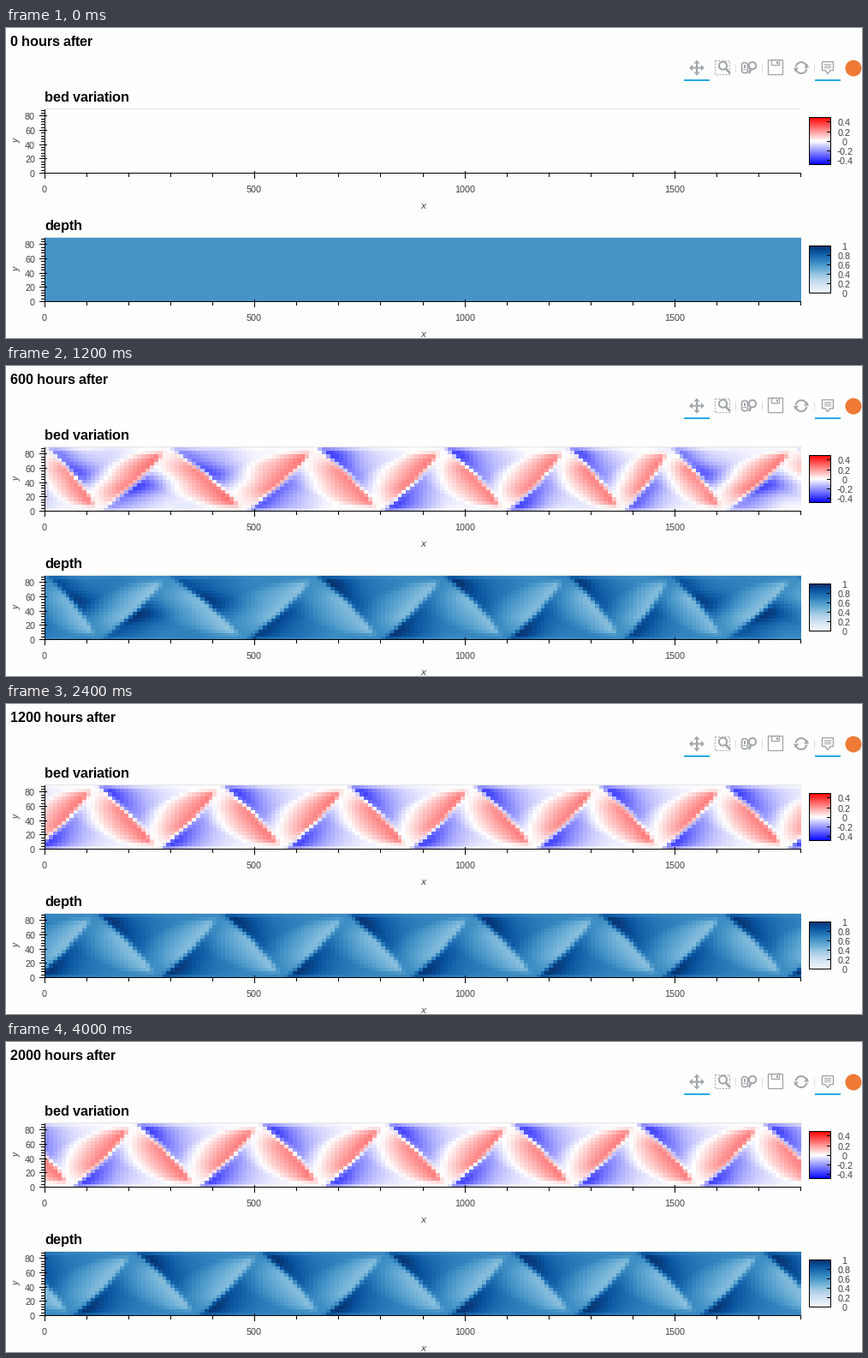
Recreate the animation shown at these times as a matplotlib script. Size 1000 by 362 pixels, loop 4200 ms.

```python
import numpy as np
import matplotlib.pyplot as plt
from matplotlib.animation import FuncAnimation
from matplotlib.patches import Arc, Circle, FancyBboxPatch, Polygon, Rectangle

W, H, DPI = 1000, 362, 100
FRAMES, STEP = 21, 200
PX = 72 / DPI
LEFT, RIGHT, PLOT_H = 45, 929, 75
NX, NY, SUB = 180, 18, 3
GRAY, ACTIVE = "#a1a6a9", "#26aae1"

plt.rcParams.update({"font.family": "Liberation Sans", "path.snap": False,
                     "text.hinting": "native", "text.hinting_factor": 1})
fig = plt.figure(figsize=(W / DPI, H / DPI), dpi=DPI, facecolor="#fefefe")
ax = fig.add_axes([0, 0, 1, 1])
ax.axis("off")


def text(x, y, s, size=11, color="#444444", ha="center", va="baseline", **kw):
    return ax.text(x, y, s, fontsize=size * PX, color=color, ha=ha, va=va, **kw)


def line(xs, ys, color="black", lw=1):
    ax.plot(xs, ys, color=color, lw=lw * PX, solid_capstyle="butt")


def box(x, y, w, h, color="black", lw=1, **kw):
    ax.add_patch(Rectangle((x, y), w, h, fill=False, ec=color, lw=lw * PX, **kw))


# Bed model: a zigzag of bar fronts whose corners touch the two banks in turn.
X, Y = np.meshgrid(LEFT + (np.arange(NX * SUB) + .5) / (NX * SUB) * (RIGHT - LEFT),
                   (np.arange(NY * SUB) + .5) / (NY * SUB))
HALF, DRIFT = 73.3, 5.6
CORNER = np.arange(-3, 17)
rng = np.random.default_rng(4)
WAVES = list(zip(rng.uniform(60, 130, 5), rng.uniform(0, 2 * np.pi, 5)))


def smooth(t):
    t = np.clip(t, 0, 1)
    return t * t * (3 - 2 * t)


def disorder(k):
    """How far each corner lags behind the even spacing: two fading clusters."""
    s = np.clip(1 - .2 * (k - 4), .05, 1)
    west = 60 * s * np.exp(-((CORNER - 4.5 + 1.2 * max(0, k - 4)) / (3 * s)) ** 2)
    east = 40 * smooth(2 * s - .3) * np.exp(-((CORNER - 12) / 1.8) ** 2)
    return west + east


def fronts(k):
    lag = disorder(k)
    v = 28 + HALF * CORNER + DRIFT * (k - 12) - lag
    z = np.zeros_like(X)
    for i in range(1, len(v) - 2):
        t = Y if CORNER[i] % 2 == 0 else 1 - Y
        d = v[i] + (v[i + 1] - v[i]) * t + 3 + 28 * t * (1 - t) - X
        up, down = (v[i + 1] - v[i - 1]) / 147, (v[i + 2] - v[i]) / 147
        reach = up * (18 + 50 * np.sin(np.pi * t ** 1.2))
        crest = .3 * smooth(t / .4) * (1 - smooth((t - .84) / .12))
        bar = crest * np.clip(1 - d / reach, 0, 1) * (1 - np.exp(-np.abs(d) / 2))
        # scour sits at the bank, or mid-channel where the pattern is disturbed
        mid = min(1, lag[i] / 55)
        bank = .52 * (1 - t) ** 1.3 * (.4 + .6 * smooth(t / .1))
        hole = .42 * np.exp(-((t - .4) / .17) ** 2) + .3 * bank
        e = np.maximum(-d, 0)
        decay = np.exp(-(e / (down * (40 - 12 * t))) ** 1.2)
        pit = (bank + mid * (hole - bank)) * decay * (1 - np.exp(-e / 2.5))
        z += np.where(d > 0, bar, -pit)
    return z


def ripples(k):
    z = sum(np.cos(2 * np.pi * (X - 8 * k) / p + a) * np.cos(np.pi * (1 + j % 3) * Y)
            for j, (p, a) in enumerate(WAVES))
    return .06 * k * np.exp(-.6 * k) * z


def bed(k):
    z = smooth(k / 4) * fronts(k) + ripples(k)
    return z.reshape(NY, SUB, NX, SUB).mean(axis=(1, 3))


def heatmap(top, cmap, lo, hi):
    return ax.imshow(np.zeros((NY, NX)), cmap=cmap, vmin=lo, vmax=hi, origin="lower",
                     extent=(LEFT, RIGHT, top + PLOT_H, top), aspect="auto",
                     interpolation="nearest")


def panel(top, title):
    base = top + PLOT_H - .5
    line([LEFT, RIGHT], [top - .5] * 2, "#e5e5e5")
    line([LEFT, RIGHT], [base] * 2)
    line([LEFT + .5] * 2, [top, base])
    text(LEFT, top - 9, title, 16, "black", "left", weight="bold")
    for u in range(0, 1801, 100):
        x = LEFT + .5 + int(u * 883 / 1800 + .5)
        major = u % 500 == 0
        line([x, x], [base - 2.5 if major else base, base + (6.5 if major else 4.5)])
        if major:
            text(x - .5, base + 22.5, str(u))
    for u in range(0, 90, 4):
        y = base - int(u * PLOT_H / 90 + .5)
        major = u % 20 == 0
        line([LEFT - (6 if major else 4), LEFT + (3 if major else 0)], [y, y])
        if major:
            text(34, y + 4.5, str(u), ha="right")
    text(487, base + 41.5, "x", style="italic")
    text(13, top + 37, "y", style="italic", va="center", rotation=90)


def colorbar(top, cmap, lo, hi, ticks):
    ax.imshow(np.linspace(hi, lo, 256)[:, None], cmap=cmap, vmin=lo, vmax=hi,
              extent=(938, 964, top + 56, top), aspect="auto")
    box(938.5, top + .5, 25, 55)
    for v in ticks:
        y = top + .5 + int(55 * (hi - v) / (hi - lo) + .5)
        line([959, 964], [y, y])
        text(979.5, y + 4.5, f"{v:g}")


def lens(x, y, r, hx, hy):
    ax.add_patch(Circle((x, y), r, fill=False, ec=GRAY, lw=2 * PX))
    n = np.hypot(hx - x, hy - y)
    line([x + (hx - x) * r / n, hx], [y + (hy - y) * r / n, hy], GRAY, 2.6)


def toolbar():
    # pan
    line([800, 814], [46.5] * 2, GRAY, 2)
    line([807, 807], [39, 54], GRAY, 2)
    for dx, dy in ((1, 0), (-1, 0), (0, 1), (0, -1)):
        tip = np.array([807 + 9 * dx, 46.5 + 9 * dy])
        back, side = 4 * np.array([dx, dy]), 3.6 * np.array([dy, dx])
        ax.add_patch(Polygon([tip, tip - back + side, tip - back - side], color=GRAY, lw=0))
    # box zoom
    box(828.5, 38.5, 17, 16, GRAY, ls=(0, (2, 1.6)))
    lens(837.5, 44, 4.6, 846, 53)
    # wheel zoom
    ax.add_patch(FancyBboxPatch((860.5, 41.5), 5, 10, fill=False, ec=GRAY, lw=1.7 * PX,
                                boxstyle="round,pad=1,rounding_size=3"))
    line([863, 863], [43, 47], GRAY, 2)
    line([861, 865], [48.5] * 2, GRAY)
    lens(872, 44, 4.2, 868, 53)
    # save
    box(890.5, 37.5, 17, 17, GRAY, 1.3)
    box(894.5, 37.5, 9, 6, GRAY, 1.3)
    line([901, 901], [39, 42], GRAY, 2)
    # reset
    for a, s in ((190, 1), (10, -1)):
        ax.add_patch(Arc((929, 46.5), 13, 13, theta1=a, theta2=a + 145, ec=GRAY, lw=2 * PX))
        ax.add_patch(Polygon([(929 + s * 9, 46.5), (929 + s * 3, 46.5),
                              (929 + s * 7, 46.5 - s * 5)], color=GRAY, lw=0))
    # hover
    ax.add_patch(Polygon([(953.5, 39.5), (966.5, 39.5), (966.5, 49.5), (963, 49.5),
                          (960, 53.5), (957, 49.5), (953.5, 49.5)],
                         fill=False, ec=GRAY, lw=1.4 * PX))
    for y in (42.5, 44.5, 46.5):
        line([956, 964], [y, y], GRAY)
    for x in (852.5, 883.5, 944.5):
        line([x, x], [42, 52], "#dddddd")
    for x in (792, 945):
        line([x, x + 30], [61, 61], ACTIVE, 2)
    ax.add_patch(Circle((990, 47), 9.5, color="#ee7a35", lw=0))


bed_map = heatmap(95, "bwr", -.5, .5)
depth_map = heatmap(245, "Blues", 0, 1)
panel(95, "bed variation")
panel(245, "depth")
colorbar(104, "bwr", -.5, .5, (.4, .2, 0, -.2, -.4))
colorbar(254, "Blues", 0, 1, (1, .8, .6, .4, .2, 0))
toolbar()
clock = text(5, 21, "", 16, "black", "left", weight="bold")
ax.set_xlim(0, W)
ax.set_ylim(H, 0)


def update(k):
    z = bed(k)
    bed_map.set_data(z)
    depth_map.set_data(.61 + .04 * smooth(k / 4) - .9 * z)
    clock.set_text(f"{100 * k} hours after")
    return bed_map, depth_map, clock


anim = FuncAnimation(fig, update, frames=FRAMES, interval=STEP, repeat=True, repeat_delay=0)
plt.show()
```
